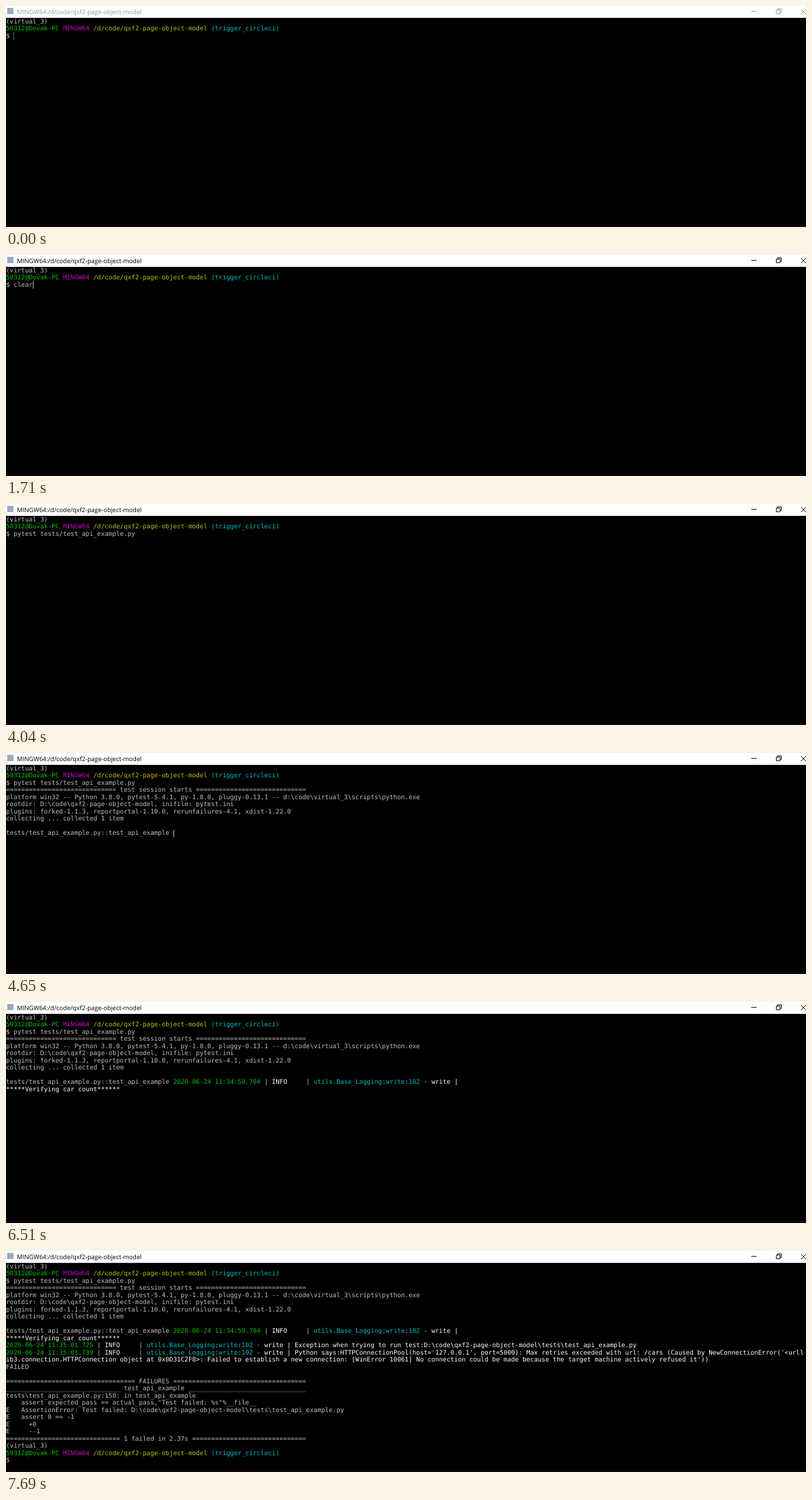
An HTML page for the animation above (8000 ms loop, 1280 px wide and 354 px high).

```html
<!DOCTYPE html>
<html lang="en">
<head>
<meta charset="utf-8">
<title>Terminal test run</title>
<style>
  html, body { margin: 0; width: 100%; height: 100%; overflow: hidden; background: #000; }
  #stage { position: relative; width: 1280px; height: 354px; overflow: hidden; background: #000; }
  #bar { position: absolute; left: 0; top: 0; width: 1280px; height: 19px; background: #fff; color: #000; }
  #bar.idle { color: #999; }
  #bar i { position: absolute; left: 2px; top: 3px; width: 10px; height: 10px; background: #9aabc0; }
  #bar b { position: absolute; left: 17.5px; top: 0; white-space: pre;
    font: 400 9.95px/18px "Open Sans", sans-serif; text-rendering: geometricPrecision; }
  #bar svg { position: absolute; left: 1180px; top: 0; fill: none; stroke: currentColor; stroke-width: 1; }
  #term { position: absolute; left: 0; top: 19.6px; color: #bfbfbf;
    font: 10.1px/11.5px "DejaVu Sans Mono", "Liberation Mono", monospace;
    text-rendering: geometricPrecision; font-variant-ligatures: none; }
  #term div { position: absolute; left: 0; white-space: pre; }
  .g { color: #00bf00; } .m { color: #bf00bf; } .y { color: #bfbf00; }
  .c { color: #00bfbf; } .w { color: #fff; }
  #caret { position: absolute; width: 1px; height: 12px; background: #bfbfbf; }
  #mouse { position: absolute; left: 0; top: 0; stroke: #bfbfbf; fill: none; }
  #edge { position: absolute; left: 0; top: 350px; width: 1280px; height: 4px; background: #0c0208; }
</style>
</head>
<body>
<div id="stage">
  <div id="bar" class="idle"><i></i><b>MINGW64:/d/code/qxf2-page-object-model</b>
    <svg width="100" height="19">
      <path d="M12.5 8.5H21"/>
      <path d="M52.5 6.5h6v6h-6zM54.5 6.5v-2h6v6h-2"/>
      <path d="M92 5l8 8M100 5l-8 8"/>
    </svg>
  </div>
  <div id="term"></div>
  <div id="caret"></div>
  <svg id="mouse" width="6" height="12"><path d="M.5.5h2M3.5.5h2M3 1v10M.5 11.5h2M3.5 11.5h2"/></svg>
  <div id="edge"></div>
</div>
<script>
const LOOP = 8000, COL = 6.08, ROW = 11.5, TOP = 19;
const $ = id => document.getElementById(id);
const esc = s => s.replace(/&/g, '&amp;').replace(/</g, '&lt;');
const tint = (cls, s) => `<span class="${cls}">${esc(s)}</span>`;
const rule = (ch, left, title, right) => ch.repeat(left) + ` ${title} ` + ch.repeat(right);

const prompt = tint('g', '50312@Dovak-PC') + ' ' + tint('m', 'MINGW64') + ' ' +
  tint('y', '/d/code/qxf2-page-object-model') + ' ' + tint('c', '(trigger_circleci)');
const log = (time, msg) => tint('g', '2020-06-24 ' + time) + ' | ' + tint('w', 'INFO    ') + ' | ' +
  ['utils.Base_Logging', 'write', '102'].map(s => tint('c', s)).join(':') + ' - ' + tint('w', 'write |' + msg);
const testName = 'tests/test_api_example.py::test_api_example ';

// [row, html, shown from, shown until]
const lines = [];
const add = (from, row, ...html) => html.forEach((h, i) => lines.push([row + i, h, from, LOOP]));

add(0, 0, '(virtual_3)', prompt);
lines.push([2, '$ ', 0, 1710], [2, '$ clear', 1710, 1940]);
add(1940, 2, '$ pytest tests/test_api_example.py');
add(4570, 3,
  rule('=', 29, 'test session starts', 29),
  'platform win32 -- Python 3.8.0, pytest-5.4.1, py-1.8.0, pluggy-0.13.1 -- d:\\code\\virtual_3\\scripts\\python.exe',
  'rootdir: D:\\code\\qxf2-page-object-model, inifile: pytest.ini',
  'plugins: forked-1.1.3, reportportal-1.10.0, rerunfailures-4.1, xdist-1.22.0');
lines.push([7, 'collecting ... ', 4570, 4650]);
add(4650, 7, 'collecting ... collected 1 item');
lines.push([9, testName, 4650, 4880]);
add(4880, 9, testName + log('11:34:59.704', ''), tint('w', '*****Verifying car count******'));
add(6910, 11,
  log('11:35:01.725', ' Exception when trying to run test:D:\\code\\qxf2-page-object-model\\tests\\test_api_example.py'),
  log('11:35:01.739', " Python says:HTTPConnectionPool(host='127.0.0.1', port=5000): Max retries exceeded with url: /cars (Caused by NewConnectionError('<urll"),
  tint('w', "ib3.connection.HTTPConnection object at 0x0D31C2F8>: Failed to establish a new connection: [WinError 10061] No connection could be made because the target machine actively refused it'))"));
add(6990, 14, 'FAILED', '',
  rule('=', 34, 'FAILURES', 35),
  rule('_', 30, 'test_api_example', 31),
  'tests\\test_api_example.py:150: in test_api_example',
  '    assert expected_pass == actual_pass,"Test failed: %s"%__file__',
  'E   AssertionError: Test failed: D:\\code\\qxf2-page-object-model\\tests\\test_api_example.py',
  'E   assert 0 == -1',
  'E     +0',
  'E     --1',
  rule('=', 30, '1 failed in 2.37s', 30));
add(7220, 25, '(virtual_3)', prompt, '$ ');

for (const line of lines) {
  const el = document.createElement('div');
  el.innerHTML = line[1];
  el.style.top = line[0] * ROW + 'px';
  $('term').append(el);
  line.push(el);
}

// [time, column, row]; no column means the caret is off
const caretSteps = [
  [0, 2, 2], [1480], [1710, 7, 2], [1940, 35, 2], [2480, 0, 3], [3010], [3490, 0, 3], [4040],
  [4570, 15, 7], [4650, 44, 9], [4880, 0, 11], [5430], [5980, 0, 11], [6510],
  [6910, 0, 14], [6990, 0, 25], [7220, 2, 27], [7690]
];

// Pointer: eight small moves, then two jumps
function pointer(t) {
  if (t < 230 || t >= 1710) return null;
  if (t >= 1160) return [902, 329];
  if (t >= 930) return [908, 333];
  const k = Math.min(7, Math.floor((t - 230) / 78.5)) / 7;
  return [903 + Math.round(5 * k), 318 + Math.round(11 * k)];
}

function draw(t) {
  const show = (el, on) => { el.style.visibility = on ? 'visible' : 'hidden'; };
  for (const [, , from, until, el] of lines) show(el, t >= from && t < until);

  const [, col, row] = caretSteps.filter(s => s[0] <= t).pop();
  const caret = $('caret');
  show(caret, col !== undefined);
  if (col !== undefined) {
    caret.style.left = Math.round(col * COL) + 'px';
    caret.style.top = Math.round(TOP + row * ROW) + 'px';
  }
  caret.style.opacity = t < 930 ? 0.6 : 1;
  $('bar').className = t < 930 ? 'idle' : '';

  const p = pointer(t);
  show($('mouse'), p);
  if (p) $('mouse').style.transform = `translate(${p[0]}px, ${p[1]}px)`;
}

const start = performance.now();
function tick() {
  draw((performance.now() - start) % LOOP);
  requestAnimationFrame(tick);
}
draw(0);
requestAnimationFrame(tick);
</script>
</body>
</html>
```
